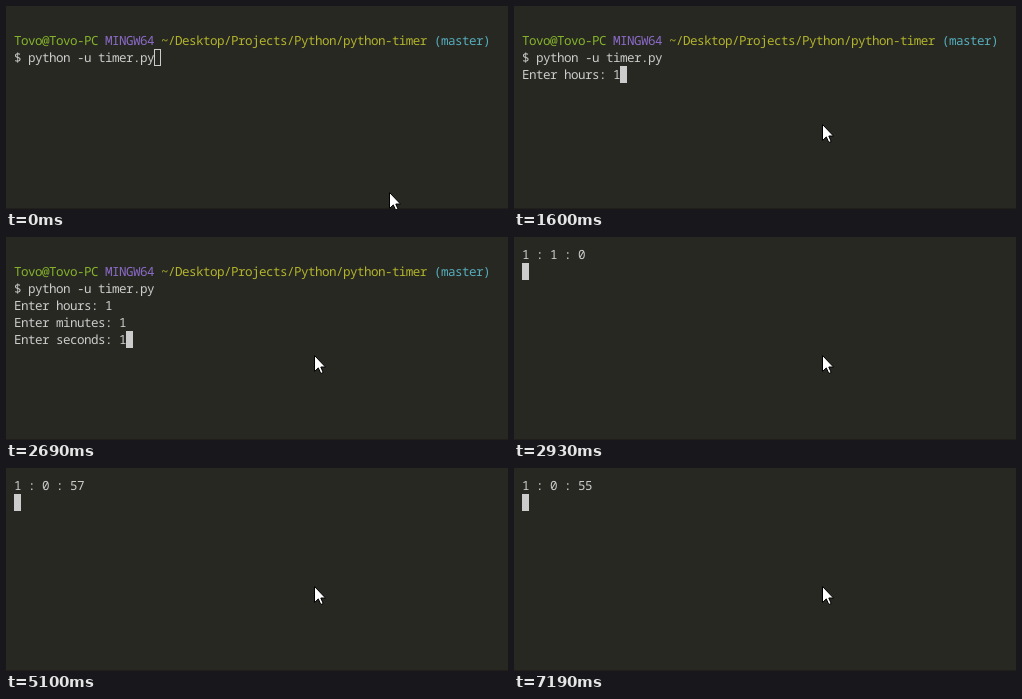
Write an HTML page that moves like this. It is 502 px wide and 203 px high and loops after 8000 ms.

```html
<!DOCTYPE html>
<html lang="en">
<head>
<meta charset="utf-8">
<title>Terminal timer</title>
<style>
  html, body { margin: 0; width: 100%; height: 100%; overflow: hidden; background: #272822; }
  svg { display: block; width: 502px; height: 203px; }
  text {
    font: 12.6px "Noto Sans Mono", "DejaVu Sans Mono", monospace;
    letter-spacing: -0.56px;
    white-space: pre;
    text-rendering: geometricPrecision;
    fill: #ccc;
  }
</style>
</head>
<body>
<svg viewBox="0 0 502 203">
  <rect width="502" height="203" fill="#272822"/>
  <rect y="202" width="502" height="1" fill="#211e1b"/>
  <g id="lines"></g>
  <rect id="caret" stroke="#ccc" width="6" height="16"/>
  <path id="mouse" d="M.5 .5V16.5L4.3 12.9L6.8 18.5L9.2 17.5L6.8 12H11.5Z"
        fill="#fff" stroke="#000" stroke-width="1"/>
</svg>
<script>
const LOOP = 8000, LEFT = 8, TOP = 9, CELL = 7, ROW = 17;
const NS = "http://www.w3.org/2000/svg";
const byId = id => document.getElementById(id);
const lines = byId("lines"), caret = byId("caret"), mouse = byId("mouse");

const prompt = [
  ["Tovo@Tovo-PC ", "#86b42b"],
  ["MINGW64 ", "#8c6bc8"],
  ["~/Desktop/Projects/Python/python-timer ", "#b3b42b"],
  ["(master)", "#56adbc"]
];
const command = "$ python -u timer.py";

// Each question: time asked, time answered, label
const questions = [
  [750, 1600, "Enter hours: "],
  [1850, 2230, "Enter minutes: "],
  [2460, 2690, "Enter seconds: "]
];
const ticks = [
  [2930, "1 : 1 : 0"],
  [4010, "1 : 0 : 58"],
  [5100, "1 : 0 : 57"],
  [6110, "1 : 0 : 56"],
  [7190, "1 : 0 : 55"]
];
// Pointer path: time, share of the way
const moves = [[0, 0], [70, 0.4], [147, 0.8], [223, 1]];

const latest = (list, t) => list.filter(item => item[0] <= t).pop();

function addText(str, col, row, color) {
  const el = document.createElementNS(NS, "text");
  el.setAttribute("x", LEFT + col * CELL);
  el.setAttribute("y", TOP + row * ROW + 13);
  if (color) el.style.fill = color;
  el.textContent = str;
  lines.append(el);
}

function drawSession(t) {
  let col = 0;
  for (const [str, color] of prompt) {
    addText(str, col, 1, color);
    col += str.length;
  }
  const rows = [command];
  for (const [asked, answered, label] of questions) {
    if (t >= asked) rows.push(label + (t >= answered ? "1" : ""));
  }
  rows.forEach((str, i) => addText(str, 0, i + 2));
  return [rows[rows.length - 1].length, rows.length + 1];
}

let shown = "";

function render(t) {
  const tick = latest(ticks, t);
  const typed = questions.flat().filter(v => v <= t).length;
  const key = tick ? tick[1] : "session" + typed;
  if (key !== shown) {
    shown = key;
    lines.replaceChildren();
    let col = 0, row = 1;
    if (tick) addText(tick[1], 0, 0);
    else [col, row] = drawSession(t);
    caret.setAttribute("x", LEFT + col * CELL + 0.5);
    caret.setAttribute("y", TOP + row * ROW + 0.5);
  }
  caret.setAttribute("fill", t < 300 ? "none" : "#ccc");

  const k = latest(moves, t)[1];
  const x = Math.round(383 - 75 * k), y = Math.round(186 - 68 * k);
  mouse.setAttribute("transform", `translate(${x} ${y})`);
}

const start = performance.now();
function loop(now) {
  render(Math.max(0, now - start) % LOOP);
  requestAnimationFrame(loop);
}
render(0);
requestAnimationFrame(loop);
</script>
</body>
</html>
```
